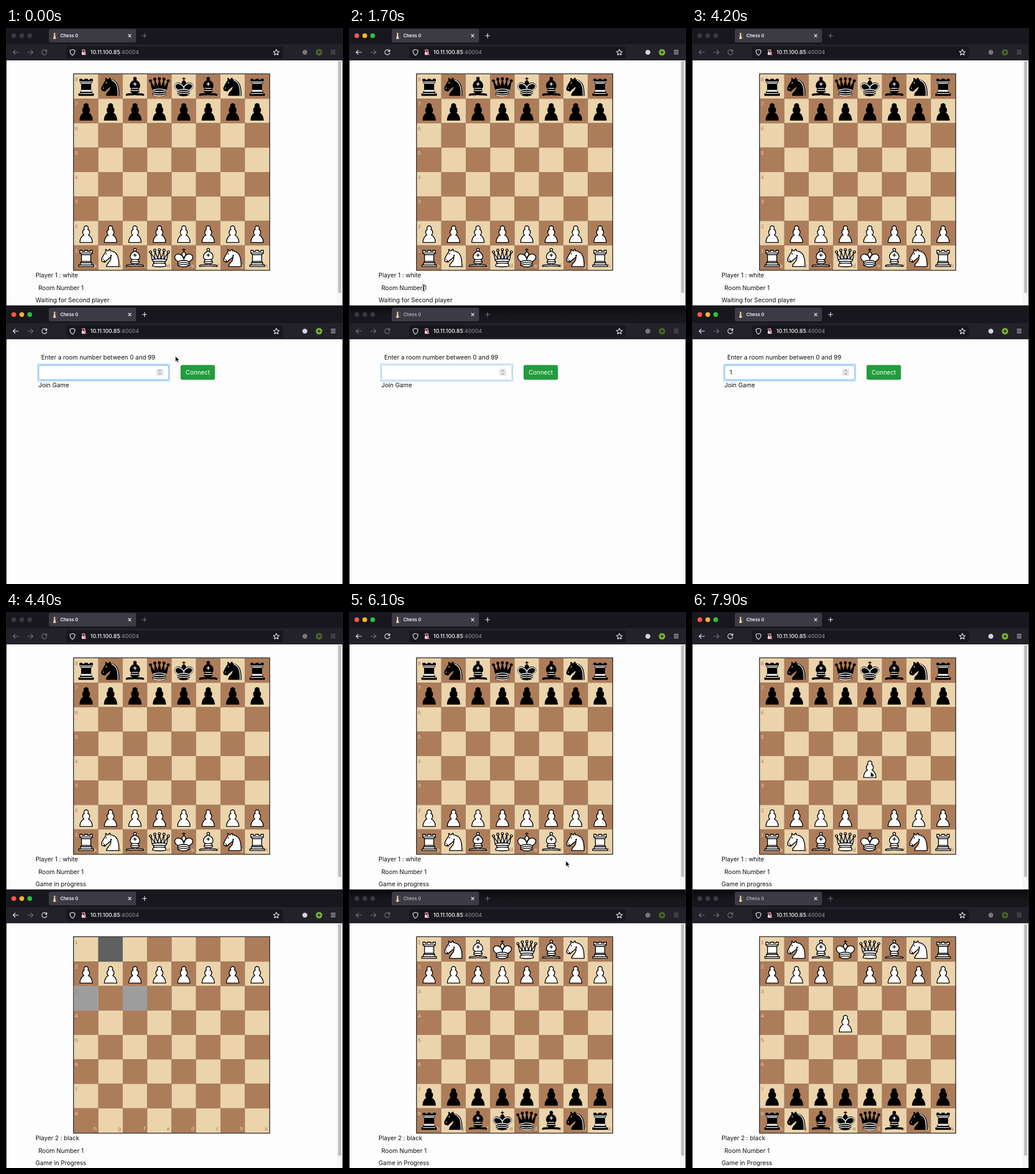
Animation of 583 by 961 pixels, one loop 8 s. Source, as an HTML page:

```html
<!DOCTYPE html>
<html lang="en">
<head>
<meta charset="utf-8">
<title>Chess 0</title>
<style>
  html, body { margin: 0; width: 100%; height: 100%; overflow: hidden; background: #fefdfe; }
  svg { display: block; width: 100vw; height: 100vh; }
  text { font: 10.5px Inter, Roboto, sans-serif; fill: #111; white-space: pre; }
  .tab { font-size: 7.8px; font-weight: 600; fill: #fbfbfe; }
  .url { font-size: 9.4px; font-weight: 500; fill: #fbfbfe; }
  .port { font-weight: 400; fill: #9a99a2; }
  .note { font: 9.5px "Liberation Sans", Arial, sans-serif; }
  .line { fill: none; stroke: #f2f2f5; stroke-width: 1.1; stroke-linecap: round; stroke-linejoin: round; }
  .soft { stroke: #74737c; }
  .shade { display: none; }
  .idle .light { fill: #3b3a41; }
  .idle .line.dim { stroke: #77767f; }
  .idle .mark { fill: #77767f; }
  .idle .badge { fill: #4c6a21; }
  .idle .badge + path { stroke: #23222b; }
  #bottom.idle .tab { fill: #c4c4ca; font-weight: 500; }
  #bottom.idle .shade { display: block; }
</style>
</head>
<body>
<svg id="stage" viewBox="0 0 583 961" xmlns="http://www.w3.org/2000/svg"></svg>
<script>
const LOOP = 8000, STEP = 100;
const CELL = 42.25, LEFT = 117.5, TOP = 80, OFFSET = 482;
const LIGHT = '#ebd3ab', DARK = '#ad7d5a';

// Outline, detail lines on a white piece, detail lines on a black piece (45 unit grid).
const PIECES = {
  P: ['M22.5 9c-2.2 0-4 1.8-4 4 0 .9.3 1.7.8 2.4C17.3 16.5 16 18.6 16 21c0 2 .9 3.8 2.4 5C15.4 27.1 11 31.6 11 39.5h23c0-7.9-4.4-12.4-7.4-13.5C28.1 24.8 29 23 29 21c0-2.4-1.3-4.5-3.3-5.6.5-.7.8-1.5.8-2.4 0-2.2-1.8-4-4-4z', '', ''],
  R: ['M9 39h27v-3H9zM12 36v-4h21v4zM11 14V9h4v2h5V9h5v2h5V9h4v5l-3 3v12.5l1.5 2.5h-20l1.5-2.5V17z',
    'M11 14h23M14 17h17M14 29.5h17', 'M12 35.5h21M13 31.5h19M14 29.5h17M14 16.5h17M11 14h23'],
  N: ['M22 10c10.5 1 16.5 8 16 29H15c0-9 10-6.5 8-21M24 18c.4 2.9-5.6 7.4-8 9-3 2-2.8 4.3-5 4-1-.9 1.4-3 0-3-1 0 .2 1.2-1 2-1 0-4 1-4-4 0-2 6-12 6-12s1.9-1.9 2-3.5c-.7-1-.5-2-.5-3 1-1 3 2.5 3 2.5h2s.8-2 2.5-3c1 0 1 3 1 3',
    'M9 25.3v.4M14.8 15l-.6 1', 'M9 25.3v.4M14.8 15l-.6 1M25 11.3c8 2 12 9.500 11.300 27.500'],
  B: ['M9 36c3.4-1 10.100.4 13.500-2 3.400 2.400 10.100 1 13.500 2 0 0 1.600.5 3 2-.7 1-1.600 1-3 .5-3.400-1-10.100.5-13.500-1-3.400 1.500-10.100 0-13.500 1-1.400.5-2.300.5-3-.5 1.400-1.900 3-2 3-2zM15 32c2.500 2.500 12.500 2.500 15 0 .5-1.500 0-2 0-2 0-2.500-2.500-4-2.500-4 5.500-1.500 6-11.500-5-15.500-11 4-10.500 14-5 15.500 0 0-2.500 1.500-2.500 4 0 0-.5.5 0 2zM25 8a2.500 2.500 0 1 1-5 0 2.500 2.500 0 1 1 5 0z',
    'M17.500 26h10M15 30h15M22.500 15.500v5M20 18h5', 'M17.500 26h10M15 30h15M22.500 15.500v5M20 18h5'],
  Q: ['M9 26c8.500-1.500 21-1.500 27 0l2.500-12.500L31 25l-.3-14-5.200 13.500-3-15-3 15L14.300 11 14 25 6.500 13.500zM9 26c0 2 1.500 2 2.500 4 1 1.500 1 1 .5 3.500-1.500 1-1.500 2.500-1.500 2.500-1.500 1.500.5 2.500.5 2.500 6.500 1 16.500 1 23 0 0 0 1.500-1 0-2.500 0 0 .5-1.500-1-2.500-.5-2.500-.5-2 .5-3.500 1-2 2.500-2 2.500-4-8.500-1.500-18.500-1.500-27 0z'
    + [[6, 12], [14, 9], [22.5, 8], [31, 9], [39, 12]].map(([x, y]) => `M${x - 2} ${y}a2 2 0 1 1 4 0a2 2 0 1 1-4 0z`).join(''),
    'M11.500 30c3.500-1 18.500-1 22 0M12 33.500c6-1 15-1 21 0',
    'M11 29a35 35 0 0 1 23 0M12.500 31.500h20M11.500 34.500a35 35 0 0 0 22 0M10.500 37.500a35 35 0 0 0 24 0'],
  K: ['M22.500 11.600V6M20 8h5M22.500 25s4.500-7.500 3-10.500c0 0-1-2.500-3-2.500s-3 2.500-3 2.500c-1.500 3 3 10.500 3 10.500M11.500 37c5.500 3.500 15.500 3.500 21 0v-7s9-4.500 6-10.500c-4-6.500-13.500-3.500-16 4V27v-3.500c-3.500-7.500-13-10.500-16-4-3 6 5 10 5 10z',
    'M11.500 30c5.500-3 15.500-3 21 0M11.500 33.500c5.500-3 15.500-3 21 0M11.500 37c5.500-3 15.500-3 21 0',
    'M11.500 30c5.500-3 15.500-3 21 0M11.500 33.500c5.500-3 15.500-3 21 0M11.500 37c5.500-3 15.500-3 21 0M32 29.500s8.500-4 6-9.600C34.100 14 25 18 22.500 24.500v2.100-2.100C20 18 9.900 14 7 19.900c-2.500 5.600 4.900 9 4.900 9']
};

// time, x, y, shape until the next key
const CURSOR = [
  [0, 293, 567, 'arrow'], [400, 293, 567, 'arrow'], [1400, 140, 453, 'ibeam'], [1600, 129, 449, 'ibeam'],
  [2400, 129, 449, 'ibeam'], [2600, 136, 480, 'arrow'], [3200, 166, 586, 'ibeam'], [3900, 166, 586, ''],
  [4800, 166, 586, 'arrow'], [5300, 390, 530, 'ibeam'], [5400, 403, 526, 'ibeam'], [5700, 403, 512, 'arrow'],
  [6100, 375, 430, 'arrow'], [6900, 316, 320, 'arrow'], [7200, 309, 357, 'arrow'], [7300, 309, 361, 'arrow'],
  [7600, 309, 276, 'arrow'], [LOOP, 309, 276, 'arrow']
];

const rect = (x, y, w, h, fill, extra = '') => `<rect x="${x}" y="${y}" width="${w}" height="${h}" fill="${fill}" ${extra}/>`;
const label = (x, y, text, extra = '') => `<text x="${x}" y="${y}" ${extra}>${text}</text>`;
const line = (d, cls = '') => `<path class="line ${cls}" d="${d}"/>`;
const dot = (x, y, r, fill, cls = '') => `<circle cx="${x}" cy="${y}" r="${r}" fill="${fill}" class="${cls}"/>`;
const cellX = col => LEFT + col * CELL;
const cellY = row => TOP + row * CELL;

function symbols() {
  return Object.entries(PIECES).map(([kind, [body, whiteLines, blackLines]]) =>
    [['w', '#fff', '#000', whiteLines], ['b', '#000', '#fff', blackLines]].map(([side, fill, ink, lines]) =>
      `<symbol id="${side}${kind}" viewBox="0 0 45 45"><g stroke-width="1.5" stroke-linecap="round" stroke-linejoin="round">
       <path d="${body}" fill="${fill}" stroke="#000"/><path d="${lines}" fill="none" stroke="${ink}"/></g></symbol>`).join('')).join('');
}

const piece = (code, col, row, id = '') =>
  `<use id="${id}" href="#${code}" x="${cellX(col)}" y="${cellY(row)}" width="${CELL}" height="${CELL}"/>`;

function board(id, flipped, hinted) {
  const ranks = flipped ? '12345678' : '87654321', files = flipped ? 'hgfedcba' : 'abcdefgh';
  const back = flipped ? 'RNBKQBNR' : 'RNBQKBNR';
  const [far, near] = flipped ? ['w', 'b'] : ['b', 'w'];
  let squares = '', notes = '', men = '';
  for (let row = 0; row < 8; row++) for (let col = 0; col < 8; col++)
    squares += rect(cellX(col), cellY(row), CELL, CELL, (row + col) % 2 ? DARK : LIGHT);
  const hints = hinted.map(([col, row]) =>
    rect(cellX(col), cellY(row), CELL, CELL, (row + col) % 2 ? '#5f6061' : '#9e9d9e')).join('');
  for (let i = 0; i < 8; i++) {
    notes += label(LEFT + 1.5, cellY(i) + 12, ranks[i], `class="note" style="fill:${i % 2 ? LIGHT : DARK}"`);
    notes += label(cellX(i + 1) - 3, TOP + 8 * CELL - 4, files[i],
      `class="note" text-anchor="end" style="fill:${i % 2 ? DARK : LIGHT}"`);
    men += piece(far + back[i], i, 0) + piece(near + back[i], i, 7);
    const whiteRow = flipped ? 1 : 6, kingFile = flipped ? 3 : 4;
    men += piece('bP', i, 7 - whiteRow) + (i === kingFile ? '' : piece('wP', i, whiteRow));
  }
  men += flipped ? piece('wP', 3, 1, id + 'Pawn') : piece('wP', 4, 6, id + 'Pawn');
  return rect(LEFT - 1.5, TOP - 1.5, 8 * CELL + 3, 8 * CELL + 3, '#3d3a37') + squares +
    `<g id="${id}Hints">${hints}</g>${notes}<g id="${id}Men">${men}</g>`;
}

function chrome() {
  return rect(0, -1, 583, 30, '#18171d') + rect(0, 28, 583, 28, '#23222b') +
    rect(0, -1, 583, 18, 'url(#shadow)', 'class="shade"') +
    dot(13.5, 13.3, 4.1, '#ff544d', 'light') + dot(27.3, 13.3, 4.1, '#f6b52e', 'light') + dot(41, 13.3, 4.1, '#2bc23f', 'light') +
    rect(74, 1.5, 151, 23.5, '#3b3a45', 'rx="3"') +
    '<path d="M82.500 8.500h3l-.5 3 1.500 7.500h-5l1.500-7.500z" fill="#e4d0a2"/><path d="M88 9v2M87 12.500h2M88 15v3" stroke="#77654b"/>' +
    label(94, 16.3, 'Chess 0', 'class="tab"') +
    line('M211.700 11l4.600 4.600M216.300 11l-4.600 4.600') + line('M236 13.300h7.400M239.700 9.600v7.400', 'dim') +
    line('M21.500 42h-9M16 38.300L12.300 42l3.700 3.700', 'dim') + line('M37.500 42h9M43 38.300l3.700 3.700-3.700 3.700', 'soft') +
    line('M69.700 39.300a4.300 4.300 0 1 0 .8 3.600M70.500 37.500v3h-3', 'dim') +
    rect(104, 32, 375, 20.500, '#18171d', 'rx="3"') +
    line('M115 37.300l4.300 1.500c0 4.500-1 6.700-4.300 8.400-3.300-1.700-4.300-3.900-4.300-8.400z') +
    rect(131, 41.500, 7, 5, '#dddde2', 'rx="1"') + line('M132.500 41.500v-2a2 2 0 0 1 4 0v2') +
    '<path d="M130.500 37.500l8.500 9" stroke="#ff3b5c" stroke-width="1.300"/>' +
    label(146, 45.400, '10.11.100.85<tspan class="port">:40004</tspan>', 'class="url"') +
    line('M467.700 37l1.500 3.300 3.600.4-2.700 2.400.8 3.600-3.200-1.900-3.200 1.900.8-3.600-2.700-2.400 3.600-.4z') +
    dot(517, 42, 4.300, '#d5d5da', 'mark') + dot(541.5, 42, 5.500, '#7fbd2b', 'badge') +
    '<path d="M538.500 42h6M541.500 39v6" stroke="#23222b" stroke-width="1.400"/>' +
    line('M562.500 38.700h7M562.500 41.700h7M562.500 44.700h7', 'dim');
}

const scrollbar = rect(572, 56, 10, 424, '#f6f5f7') + rect(574.5, 57, 5.500, 401, '#bebdbf', 'rx="2.700"');

const status = (player, id, state) =>
  label(51, 431, player) + label(56, 452.5, 'Room Number 1') + label(51, 474, state, `id="${id}Status"`);

const form = label(61, 91, 'Enter a room number between 0 and 99') +
  rect(56.5, 101, 225, 25, '#fff', 'rx="3" stroke="#c8d8e0"') +
  rect(56.5, 101, 225, 25, 'none', 'id="glow" rx="3" stroke="#8ec3fb" stroke-width="1.500" style="outline:2px solid #bfdeff;outline-offset:0"') +
  rect(260, 107, 12, 12, '#e6e5e7', 'rx="1"') +
  '<path d="M264 111.500l2-2.200 2 2.200M264 114.500l2 2.200 2-2.200" fill="none" stroke="#66656a"/>' +
  label(65, 117, '1', 'id="typed"') + rect(65.500, 106.500, 1, 13, '#222', 'id="caret"') +
  rect(302, 100.500, 59.500, 25.500, '#229c3c', 'rx="3"') +
  label(331.7, 117.200, 'Connect', 'text-anchor="middle" style="fill:#fff"') + label(56, 138.500, 'Join Game');

const stage = document.getElementById('stage');
stage.innerHTML = `<defs>${symbols()}
  <linearGradient id="shadow" x2="0" y2="1"><stop stop-color="#000" stop-opacity=".55"/><stop offset="1" stop-opacity="0"/></linearGradient></defs>
  ${rect(0, 0, 583, 961, '#fefdfe')}
  <g id="top">${chrome()}${scrollbar}${board('top', false, [[4, 6], [4, 5], [4, 4]])}${status('Player 1 : white', 'top', '')}</g>
  ${rect(0, 479.5, 583, 2, '#111014')}
  <g id="bottom" transform="translate(0 ${OFFSET})">${chrome()}
    <g id="form">${form}</g>
    <g id="game">${scrollbar}${board('bottom', true, [[1, 0], [0, 2], [2, 2]])}${status('Player 2 : black', 'bottom', 'Game in Progress')}</g>
  </g>
  <path d="M.5 0v961M582.500 0v961" stroke="#1d1c22"/>
  <g id="pointer">
    <path id="arrow" d="M0 0v10l2.300-2.100 1.700 3.700 1.700-.8-1.700-3.500h3.200z" fill="#000" stroke="#fff" stroke-width=".8"/>
    <g id="ibeam" fill="none"><path d="M-2.500-5.500q2.500 0 2.500 1.500v8q0 1.500-2.500 1.500M2.500-5.500q-2.500 0-2.500 1.500v8q0 1.500 2.500 1.500M-1.500 1h3" stroke="#fff" stroke-width="2.200"/>
    <path d="M-2.500-5.500q2.500 0 2.500 1.500v8q0 1.500-2.500 1.500M2.500-5.500q-2.500 0-2.500 1.500v8q0 1.500 2.500 1.500M-1.500 1h3" stroke="#111"/></g>
  </g>`;

const el = id => document.getElementById(id);
const show = (id, on) => { el(id).style.display = on ? '' : 'none'; };
const ramp = (t, from, to) => Math.min(1, Math.max(0, (t - from) / (to - from)));

function cursorAt(t) {
  const i = CURSOR.findIndex(key => key[0] > t) - 1;
  const [t0, x0, y0, shape] = CURSOR[i], [t1, x1, y1] = CURSOR[i + 1];
  const p = ramp(t, t0, t1), eased = p * p * (3 - 2 * p);
  return { x: x0 + (x1 - x0) * eased, y: y0 + (y1 - y0) * eased, shape };
}

function draw(t) {
  const cursor = cursorAt(t);
  const bottomActive = t < 1500 || (t >= 3300 && t < 6100);
  const inGame = t >= 4400, typed = t >= 3900;

  el('top').classList.toggle('idle', bottomActive);
  el('bottom').classList.toggle('idle', !bottomActive);
  el('topStatus').textContent = inGame ? 'Game in progress' : 'Waiting for Second player';
  show('form', !inGame);
  show('game', inGame);
  show('typed', typed);
  el('glow').style.opacity = t < 1500 ? 1 : ramp(t, 3300, 3500);
  show('caret', bottomActive && (t < 1500 ? t % 1000 >= 500 : (t - 3300) % 1000 < 500));
  el('caret').setAttribute('x', typed ? 71 : 65.5);

  show('bottomHints', t < 4900);
  for (const man of el('bottomMen').children)
    man.style.display = t >= 4500 || man.getAttribute('href') === '#wP' && man.getAttribute('y') < 200 ? '' : 'none';
  el('bottomPawn').setAttribute('y', cellY(1 + 2 * ramp(t, 7700, 7900)));

  show('topHints', t >= 7100 && t < 7600);
  const dragging = t > 7300 && t < 7600;
  el('topPawn').setAttribute('x', dragging ? cursor.x - CELL / 2 : cellX(4));
  el('topPawn').setAttribute('y', dragging ? cursor.y - CELL / 2 : cellY(t >= 7600 ? 4 : 6));

  show('arrow', cursor.shape === 'arrow');
  show('ibeam', cursor.shape === 'ibeam');
  el('pointer').setAttribute('transform', `translate(${cursor.x} ${cursor.y})`);
}

const start = performance.now();
function tick() {
  const t = (performance.now() - start) % LOOP;
  draw(Math.floor(t / STEP) * STEP);
  requestAnimationFrame(tick);
}
tick();
</script>
</body>
</html>
```
